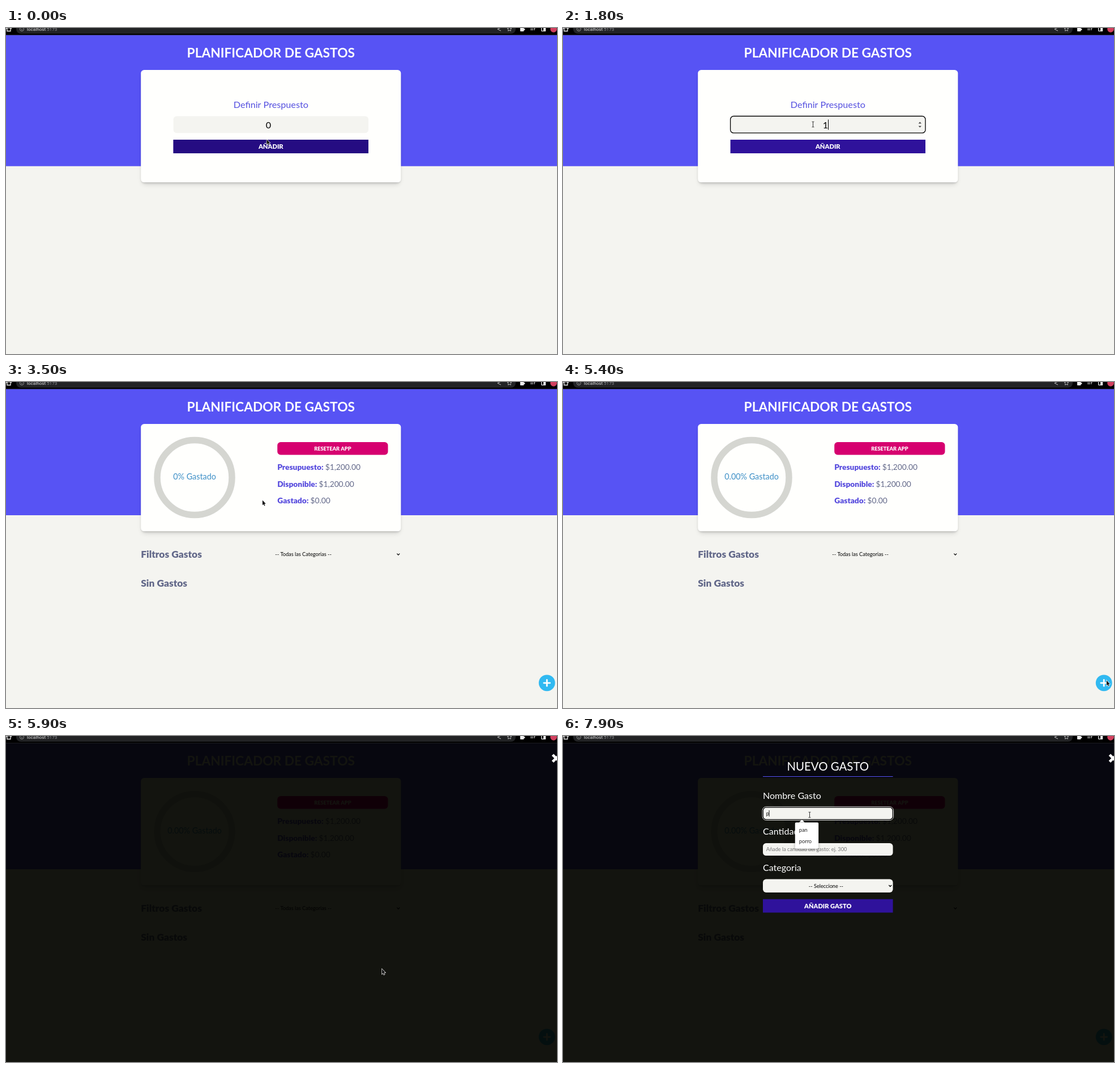
An HTML page with a canvas that plays this animation: 973x575 px, repeating every 8 s.

```html
<!DOCTYPE html>
<html lang="es">
<head>
<meta charset="utf-8">
<title>Planificador de gastos</title>
<style>
html, body { margin: 0; width: 100%; height: 100%; overflow: hidden; background: #f4f4f0; }
canvas { display: block; }
</style>
</head>
<body>
<canvas id="stage" width="973" height="575"></canvas>
<script>
const ctx = document.getElementById('stage').getContext('2d');
const W = 973, H = 575, LOOP = 8000;
const REM = 5.738, MID = 467.8, RADIUS = 5.7;
const CARD = { x: 238.2, y: 74, w: 459.2 };
const FORM = { x: 353, w: 229.6 };
const INDIGO = '#5753f4', PAPER = '#f4f4f0', WHITE = '#fffffd', SLATE = '#626889';
const clamp = v => Math.max(0, Math.min(1, v));
const lerp = (a, b, k) => a + (b - a) * k;
const easeOut = k => 1 - (1 - k) ** 2;

function text(str, x, y, rem, color, weight = 400, align = 'left') {
  ctx.font = `${weight} ${rem * REM}px Lato, sans-serif`;
  ctx.fillStyle = color;
  ctx.textAlign = align;
  ctx.fillText(str, x, y);
  return ctx.measureText(str).width;
}

function rect(x, y, w, h, color) {
  ctx.fillStyle = color;
  ctx.fillRect(x, y, w, h);
}

function box(x, y, w, h, color, r = RADIUS) {
  ctx.fillStyle = color;
  ctx.beginPath();
  ctx.roundRect(x, y, w, h, r);
  ctx.fill();
}

function ring(x, y, w, h, r, color, width) {
  ctx.strokeStyle = color;
  ctx.lineWidth = width;
  ctx.beginPath();
  ctx.roundRect(x, y, w, h, r);
  ctx.stroke();
}

function circle(x, y, r, color, width) {
  ctx.beginPath();
  ctx.arc(x, y, r, 0, 2 * Math.PI);
  ctx.fillStyle = ctx.strokeStyle = color;
  ctx.lineWidth = width;
  width ? ctx.stroke() : ctx.fill();
}

function trace(pts) {
  ctx.beginPath();
  for (let i = 0; i < pts.length; i += 2) ctx.lineTo(pts[i], pts[i + 1]);
}

function line(color, width, ...pts) {
  ctx.strokeStyle = color;
  ctx.lineWidth = width;
  trace(pts);
  ctx.stroke();
}

// four arms around a centre, turned by 45 degrees for a close sign
function cross(x, y, arm, width, turn, cap) {
  ctx.save();
  ctx.translate(x, y);
  ctx.rotate(turn);
  ctx.lineCap = cap;
  line('#fff', width, -arm, 0, arm, 0);
  line('#fff', width, 0, -arm, 0, arm);
  ctx.restore();
}

function shadowed(blur, dy, alpha, paint) {
  ctx.save();
  ctx.shadowColor = `rgba(0,0,0,${alpha})`;
  ctx.shadowBlur = blur;
  ctx.shadowOffsetY = dy;
  paint();
  ctx.restore();
}

function spinner(x, y) {
  ctx.fillStyle = '#444';
  for (const s of [-1, 1]) {
    trace([x - 2.7, y + 2.2 * s, x, y + 5 * s, x + 2.7, y + 2.2 * s]);
    ctx.fill();
  }
}

function chevron(x, y) {
  line('#000', 1.3, x - 2.4, y - 1.2, x, y + 1.3, x + 2.4, y - 1.2);
}

function star(x, y, r) {
  const pts = [];
  for (let i = 0; i <= 10; i++) {
    const a = i * Math.PI / 5, d = i % 2 ? r / 2 : r;
    pts.push(x + d * Math.sin(a), y - d * Math.cos(a));
  }
  line('#c4c4c4', 0.9, ...pts);
}

function browserBar() {
  rect(0, 0, W, 12, '#000');
  rect(0, 12, W, 0.6, '#2b2b2c');
  box(18, -8, 882, 18, '#222325', 8);
  ring(2, -3, 6, 8.5, 0, '#eee', 1.3);
  line('#eee', 1.2, 0, 1.5, 2, 0, 8, 0, 10, 1.5);
  circle(28, 2, 3.5, '#aaa', 0.8);
  line('#aaa', 0.9, 28, 1.5, 28, 4);
  ctx.font = '8.1px Roboto, sans-serif';
  ctx.textAlign = 'left';
  ctx.fillStyle = '#e4e4e4';
  ctx.fillText('localhost', 37, 5);
  const w = ctx.measureText('localhost').width;
  ctx.fillStyle = '#909296';
  ctx.fillText(':5173', 37 + w, 5);
  line('#c4c4c4', 1, 874, -1, 868, 2, 874, 5);
  star(889, 2, 4);
  box(908, -1, 6.5, 7, '#eee', 1);
  circle(915, 2.5, 1.5, '#eee');
  for (const y of [0, 3]) line('#ddd', 1.2, 926, y, 931, y);
  line('#ddd', 1.1, 935, 0, 933, 0, 933, 4);
  ring(945.6, -2, 7, 7.4, 1, '#eee', 1.2);
  rect(949, -2, 4, 8, '#eee');
  circle(967, 2, 5.8, '#d2405f');
}

function shell(headerEnd, cardEnd) {
  const { x, y, w } = CARD, h = cardEnd - y;
  rect(0, 0, W, H, PAPER);
  rect(0, 0, W, headerEnd, INDIGO);
  text('PLANIFICADOR DE GASTOS', MID, 52, 3.96, '#fff', 700, 'center');
  shadowed(8.6, 5.7, 0.12, () => box(x + 2, y + 2, w - 4, h - 4, WHITE));
  shadowed(3.4, 2.3, 0.2, () => box(x + 1, y + 1, w - 2, h - 2, WHITE));
  box(x, y, w, h, WHITE);
}

function budgetPage(t) {
  const x = 295.6, w = 344.4, center = 463.4;
  shell(243.7, 272.3);
  text('Definir Prespuesto', MID, 141, 2.82, '#5550e0', 400, 'center');
  box(x, 155.5, w, 29.7, PAPER);
  const focused = t >= 1000 && t < 3200;
  if (focused) ring(x, 155.5, w, 29.7, RADIUS, '#000', 1.3);
  if (t >= 300) spinner(630.3, 170.6);

  const value = t < 1800 ? '0' : t < 2100 ? '1' : t < 2300 ? '120' : '1200';
  const selected = t >= 1200 && t < 1800;
  if (selected) rect(center - 4.7, 161, 9.4, 19, '#3584e4');
  const len = text(value, center, 176.6, 2.8, selected ? '#fff' : '#000', 400, 'center');
  if (focused && !selected) rect(Math.floor(center + len / 2), 161.5, 1, 18, '#000');

  const hover = t < 1000 ? 1 - clamp((t - 50) / 300) : clamp((t - 2950) / 300);
  box(x, 197, w, 24, '#2f129b', 0);
  ctx.globalAlpha = hover;
  box(x, 197, w, 24, '#250c82', 0);
  ctx.globalAlpha = 1;
  text('AÑADIR', MID, 213, 1.94, '#fff', 900, 'center');
}

function summaryPage(t) {
  const left = CARD.x, right = 479.2;
  shell(235, 263.3);
  circle(333, 168.6, 66, '#d5d6d1', 11.5);
  text((t < 4300 ? '0%' : '0.00%') + ' Gastado', 333, 172, 2.5, '#3e90c7', 400, 'center');
  box(right, 106, 195.3, 22.5, '#d6006f');
  text('RESETEAR APP', 576.8, 120.6, 1.6, '#fff', 900, 'center');
  ['Presupuesto: $1,200.00', 'Disponible: $1,200.00', 'Gastado: $0.00'].forEach((row, i) => {
    const [label, value] = row.split(' '), y = 155.4 + i * 29.5;
    const w = text(label + ' ', right, y, 2.4, '#5549dd', 900);
    text(value, right + w, y, 2.4, SLATE);
  });
  text('Filtros Gastos', left, 310, 3.03, SLATE, 900);
  text('Sin Gastos', left, 360.6, 3.03, SLATE, 900);
  text('-- Todas las Categorias --', 475.3, 307.2, 1.6, '#000');
  chevron(692.8, 303.8);
  circle(955.2, 530.8, 14.4, '#31b9f1');
  cross(955.2, 530.8, 5.4, 2.8, 0, 'round');
}

function suggestions(items, w) {
  const x = 409.8, y = 152.5, step = 20.6;
  shadowed(4, 1.5, 0.35, () => box(x, y, w, 5 + items.length * step, '#fff', 2));
  trace([x + 7, y, x + 12, y - 5, x + 17, y]);
  ctx.fill();
  items.forEach((s, i) => text(s, x + 7, y + 16 + i * step, 1.62, '#222'));
}

function modal(t) {
  ctx.globalCompositeOperation = 'multiply';
  rect(0, 12, W, H, '#13140f');
  ctx.globalCompositeOperation = 'source-over';
  cross(971.5, 39.2, 8.7, 4.7, Math.PI / 4, 'butt');

  const { x, w } = FORM, inner = x + 5.8;
  const focused = t >= 7500, typed = t >= 7900;
  ctx.globalAlpha = clamp((t - 5950) / 300) ** 1.7;
  text('NUEVO GASTO', MID, 61.2, 3.56, '#fff', 400, 'center');
  rect(x, 71, w, 1, INDIGO);
  ['Nombre Gasto', 'Cantidad', 'Categoria'].forEach((label, i) => {
    text(label, x, 110.5 + i * 63.5, 2.8, '#fff');
    box(x, 125.6 + i * 63.5, w, i < 2 ? 22 : 23.3, PAPER);
  });
  if (focused) {
    ring(x - 0.8, 124.8, w + 1.6, 23.6, 6.5, '#fff', 1);
    ring(x + 0.3, 125.9, w - 0.6, 21.4, 5.4, '#000', 1.3);
  }
  if (typed) text('p', inner, 140, 1.6, '#000');
  else text('Añade el nombre del gasto', inner, 140, 1.6, '#757575');
  if (focused && (t < 7700 || typed)) rect(typed ? 363.6 : 359, 131, 0.9, 11, '#000');
  text('Añade la cantidad del gasto: ej. 300', inner, 203.2, 1.6, '#757575');
  const py = pointerAt(t).y;
  if (py > 183 && py < 212) spinner(572.5, 199.8);
  text('-- Seleccione --', 464.4, 267.8, 1.6, '#000', 400, 'center');
  chevron(577.8, 264.2);
  box(x, 287.7, w, 23.8, '#2f129b', 0);
  text('AÑADIR GASTO', MID, 303.6, 1.93, '#fff', 900, 'center');
  ctx.globalAlpha = 1;

  if (typed) suggestions(['pan', 'porro'], 41.4);
  else if (focused) suggestions(['pan', 'porro', 'cena', 'luz', 'gasolina', 'supermercado'], 82);
}

// pointer moves: start, end, and where it comes to rest
const moves = [
  { from: 0, to: 400, x: 474, y: 161.5 },
  { from: 500, to: 600, x: 476, y: 170 },
  { from: 900, to: 1400, x: 441.5, y: 170 },
  { from: 2800, to: 3200, x: 452.5, y: 208 },
  { from: 3800, to: 4100, x: 530, y: 255 },
  { from: 4200, to: 4400, x: 688, y: 499.5 },
  { from: 4600, to: 5000, x: 959.5, y: 526 },
  { from: 5600, to: 6200, x: 565, y: 372 },
  { from: 6300, to: 6600, x: 425, y: 184 },
  { from: 6600, to: 7100, x: 435.5, y: 139 }
];

function pointerAt(t) {
  return moves.reduce((p, m) => {
    const k = easeOut(clamp((t - m.from) / (m.to - m.from)));
    return { x: lerp(p.x, m.x, k), y: lerp(p.y, m.y, k) };
  }, { x: 460, y: 196 });
}

function pointer(t) {
  if (t >= 4600 && t < 5000) return;
  const { x, y } = pointerAt(t);
  const overInput = t < 3200 ? y > 156 && y < 185 : y < 148;
  if (overInput) {
    line('#333', 1, x, y - 4.5, x, y + 4.5);
    for (const end of [-4.7, 4.7]) line('#333', 0.9, x - 2, y + end, x + 2, y + end);
    return;
  }
  ctx.save();
  ctx.translate(x, y);
  trace([0.4, 0.6, 0.4, 9.2, 2.3, 7.5, 3.7, 10.6, 5, 10, 3.7, 7, 6.2, 6.8]);
  ctx.closePath();
  ctx.strokeStyle = '#fff';
  ctx.lineWidth = 1.3;
  ctx.stroke();
  ctx.fillStyle = '#111';
  ctx.fill();
  ctx.restore();
}

function draw(now) {
  // the screen refreshes ten times a second
  const t = Math.floor(now % LOOP / 100) * 100;
  if (t < 3500) budgetPage(t);
  else summaryPage(t);
  if (t >= 5500) modal(t);
  browserBar();
  pointer(t);
}

let start;
function tick(now) {
  start ??= now;
  draw(now - start);
  requestAnimationFrame(tick);
}
draw(0);
requestAnimationFrame(tick);
</script>
</body>
</html>
```
